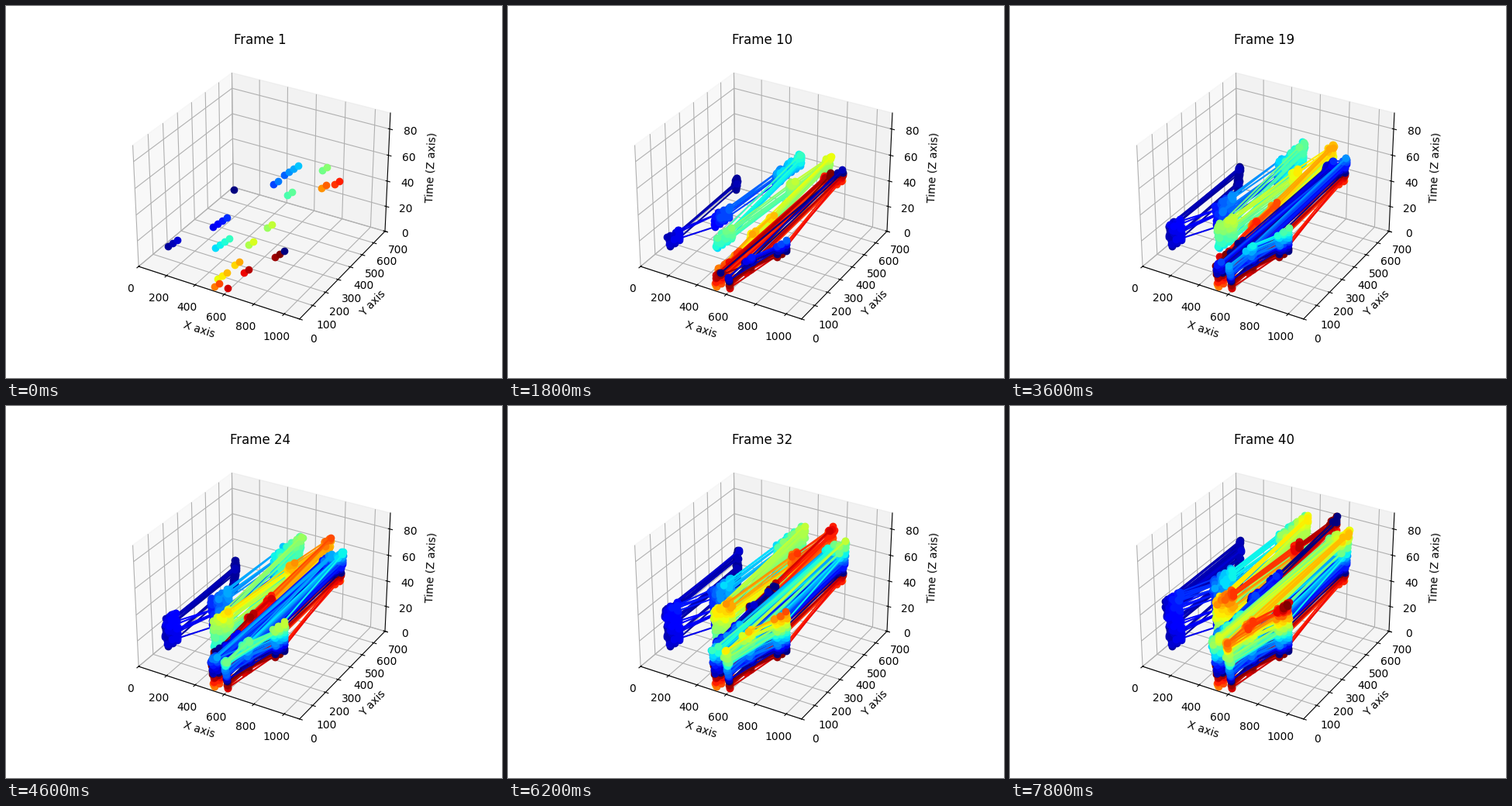
Animation of 640 by 480 pixels, one loop 8000 ms. Source, as a matplotlib script:

```python
import numpy as np
import matplotlib.pyplot as plt
from matplotlib.animation import FuncAnimation

FRAMES, INTERVAL = 40, 200
COLOURS = plt.cm.jet(np.linspace(0, 1, 42))
rng = np.random.default_rng(7)

# Clusters on the floor: stage x, stage y of the centre, number of points.
CLUSTERS = [
    (294, 237, 1), (215, 306, 3), (276, 279, 4), (348, 228, 2), (368, 212, 4),
    (279, 306, 4), (366, 242, 2), (411, 210, 2), (316, 306, 2), (340, 284, 2),
    (279, 348, 3), (298, 332, 2), (272, 360, 2), (410, 233, 2), (427, 228, 2),
    (310, 342, 2), (286, 364, 1), (353, 320, 3),
]
STEP = np.array([6, -4])

fig = plt.figure(figsize=(6.4, 4.8), dpi=100)
ax = fig.add_subplot(projection="3d")
ax.set(xlim=(0, 1100), ylim=(0, 700), zlim=(0, 92),
       xlabel="X axis", ylabel="Y axis", zlabel="Time (Z axis)")
title = ax.set_title("Frame 1")


def on_floor(spots):
    """World (x, y) of stage pixels lying on the plane z = 0."""
    ax.apply_aspect()
    proj = ax.get_proj()
    pix = [(px, 480 - py) for px, py in spots]
    out = []
    for u, v in ax.transData.inverted().transform(pix):
        rows = np.array([proj[0] - u * proj[3], proj[1] - v * proj[3]])
        out.append(np.linalg.solve(rows[:, :2], -rows[:, 3]))
    return np.array(out)


def by_x(pts):
    return pts[np.argsort(pts[:, 0])]


def detections(t, home, twin, birth):
    """Points seen at time t, sorted by x; twins join as time goes on."""
    if t == 0:
        return home
    pts = np.vstack([home, twin[birth <= t]])
    pts = pts + rng.normal(0, 4, pts.shape)
    pts[:, 1] += (pts[:, 1] - 450) * 0.07 * t / FRAMES
    return by_x(pts[rng.random(len(pts)) > 0.04])


def build_tracks():
    """Join the k-th point of every layer into track k."""
    spots = [np.array([px, py]) + STEP * (j - (n - 1) / 2)
             for px, py, n in CLUSTERS for j in range(n)]
    home = by_x(on_floor(spots))
    birth = 1 + np.arange(len(home)) * 0.618 % 1 * 36
    twin = home + rng.normal(0, (6, 10), home.shape)
    layers = [detections(t, home, twin, birth) for t in range(FRAMES)]
    return [np.array([(*pts[k], t) for t, pts in enumerate(layers)
                      if k < len(pts)])
            for k in range(max(map(len, layers)))]


tracks = build_tracks()
lines = [ax.plot([], [], [], "o-", color=COLOURS[k % len(COLOURS)])[0]
         for k in range(len(tracks))]


def update(i):
    title.set_text(f"Frame {i + 1}")
    for line, track in zip(lines, tracks):
        line.set_data_3d(*track[track[:, 2] <= i].T)
    return [title, *lines]


anim = FuncAnimation(fig, update, frames=FRAMES, interval=INTERVAL,
                     init_func=lambda: update(0), repeat=True, repeat_delay=0)
plt.show()
```
